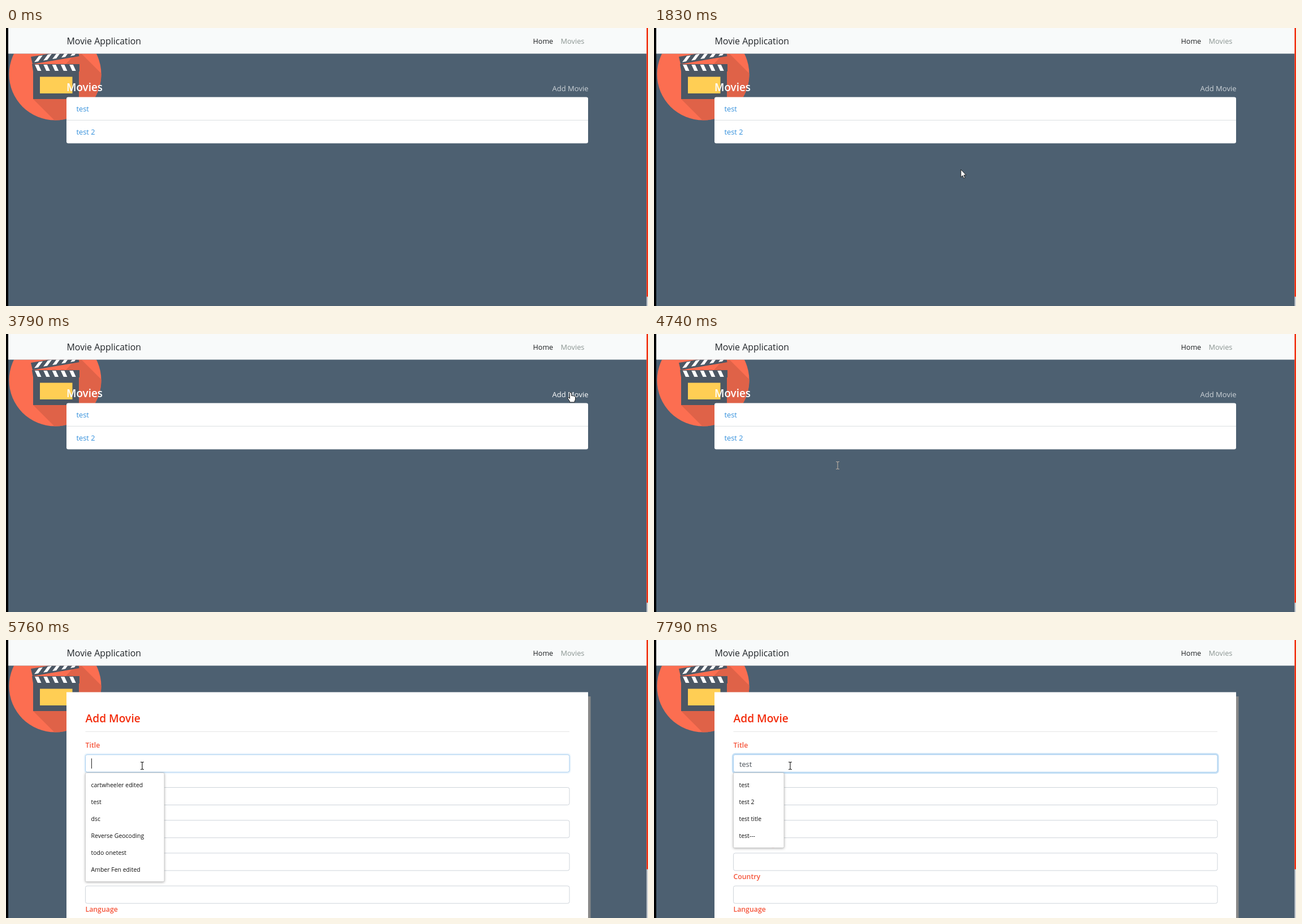
Write an HTML page that moves like this. It is 1136 px wide and 493 px high and loops after 8000 ms.

```html
<!DOCTYPE html>
<html lang="en">
<head>
<meta charset="utf-8">
<title>Movie Application</title>
<style>
  html, body { margin: 0; width: 100%; height: 100%; overflow: hidden; background: #4d6071; }
  svg { display: block; width: 100%; height: 100%; }
  text { font-family: "Open Sans", "Noto Sans", sans-serif; white-space: pre; }
  .menu { filter: drop-shadow(0 1.5px 2px rgba(0, 0, 0, .3)); }
</style>
</head>
<body>
<svg id="stage" viewBox="0 0 1136 493">
  <defs>
    <clipPath id="disc"><circle cx="87" cy="82" r="81.5"/></clipPath>
    <clipPath id="below"><rect y="45.5" width="1136" height="448"/></clipPath>
  </defs>
  <rect width="1136" height="493" fill="#4d6071"/>

  <g clip-path="url(#below)">
    <circle cx="87" cy="82" r="81.5" fill="#fc6e51"/>
    <path d="M48 126L92 170H180V92L128 40Z" fill="#df6248" clip-path="url(#disc)"/>
    <path d="M48 64H130V77H129V126H48V77L46 64Z" fill="#4c5764"/>
    <path d="M44 51L127 37L129.500 50L47 64Z" fill="#4c5764"/>
    <g id="stripes" fill="#fff"></g>
    <rect x="60" y="86.500" width="57.500" height="29.500" fill="#ffce54"/>
  </g>

  <rect width="1136" height="45.500" fill="#f8fafa"/>
  <g id="nav"></g>
  <g id="list"></g>
  <g id="form"></g>
  <rect x="1133.500" width="2.500" height="493" fill="#cfd2d6"/>
  <rect id="thumb" x="1133.500" width="2.500" fill="#f32c0c"/>
  <rect width="4" height="493" fill="#000"/>

  <g id="cursor">
    <path id="arrow" d="M0 0V13.500L3.100 10.700L5.200 15.600L7.300 14.700L5.200 9.900H9.300Z"
      fill="#fff" stroke="#111" stroke-width=".9" stroke-linejoin="round"/>
    <path id="hand" d="M-1.500 1.500Q0 -.5 1.500 1.500V6.500Q3 5.500 4 7Q5.500 6 6.500 7.500Q8.500 7 8.500 9V13Q8 15 7 16.500V18H-1.500V16.500L-4.700 11.500Q-5.500 9.500 -3.500 9.500L-1.500 11.500Z"
      fill="#fff" stroke="#111" stroke-width=".9" stroke-linejoin="round"/>
    <path id="beam" d="M-3 -6.500H-1L0 -5.500L1 -6.500H3M0 -5.500V5.500M-3 6.500H-1L0 5.500L1 6.500H3" fill="none" stroke-width="1.200"/>
  </g>
</svg>
<script>
const LOOP = 8000, STEP = 77, START = 580;
const OPEN = 4830, FOCUS = 5680, MENU = 5760;
const RED = '#f32c0c', LABEL = '#f5543a';
const $ = id => document.getElementById(id);

function add(parent, tag, attrs, content = '') {
  const el = document.createElementNS('http://www.w3.org/2000/svg', tag);
  for (const k in attrs) el.setAttribute(k, attrs[k]);
  el.textContent = content;
  return parent.appendChild(el);
}
const label = (parent, x, y, size, fill, content, more) =>
  add(parent, 'text', { x, y, 'font-size': size, fill, ...more }, content);
const box = (parent, x, y, width, height, fill, more) =>
  add(parent, 'rect', { x, y, width, height, fill, ...more });
const show = (el, on) => { el.style.display = on ? '' : 'none'; };
const BOLD = { 'font-weight': 600 };

// clapper stripes
for (let i = 0; i < 5; i++) {
  const x = 51 + i * 15.3, u = 56 + i * 16, y = 60.5 - i * 2.7;
  add($('stripes'), 'path', { d: `M${x} 65H${x + 6.5}L${x + 11.5} 76H${x + 5}Z` });
  add($('stripes'), 'path', { d: `M${u - 6} ${y}L${u + 1} ${y - 1.2}L${u + 9} ${y - 12}L${u + 2} ${y - 10.8}Z` });
}

label($('nav'), 107.5, 29, 15.9, '#212529', 'Movie Application');
label($('nav'), 932.5, 27.7, 12.6, '#1b1e20', 'Home');
label($('nav'), 981.5, 27.7, 12.8, '#8b9592', 'Movies');

const list = $('list');
label(list, 107, 112, 18.9, '#fff', 'Movies', BOLD);
const addLink = label(list, 1030.5, 112, 13, '#cdd3d8', 'Add Movie', { 'text-anchor': 'end' });
box(list, 107, 122.5, 923, 82, '#fff', { rx: 3.3 });
box(list, 107, 163, 923, 1, '#dcdfe1');
label(list, 124.5, 148, 12.8, '#3490dc', 'test');
label(list, 124.5, 189, 12.8, '#3490dc', 'test 2');

const form = $('form');
box(form, 111, 100, 923.5, 400, '#888');
box(form, 107, 92.5, 923, 410, '#fff');
label(form, 140.5, 146, 19.2, RED, 'Add Movie', BOLD);
box(form, 140.5, 162, 856.5, 1, '#e6e6e6');
const ring = box(form, 139.2, 201.8, 859, 34, 'none',
  { rx: 4.5, stroke: '#3490dc', 'stroke-opacity': .28, 'stroke-width': 2.8 });
const fields = ['Title', 'Description', 'Year', 'YKRO Rating', 'Country', 'Language'].map((name, i) => {
  const y = 58.2 * i;
  label(form, 140.5, 191.3 + y, 12.3, LABEL, name, BOLD);
  return box(form, 140.5, 203.3 + y, 856.5, 31, '#fff', { rx: 3.3, stroke: '#ced4da' });
});
const typed = label(form, 151, 224.5, 12.7, '#495057', '');
const caret = box(form, 151, 210, 1, 18, '#222');

function menu(width, items) {
  const g = add(form, 'g', { class: 'menu' });
  box(g, 140.5, 235.5, width, items.length * 30 + 13, '#fff', { rx: 2, stroke: '#c8c8c8', 'stroke-width': .8 });
  items.forEach((s, i) => label(g, 150.5, 261.2 + 30 * i, 10.5, '#111', s, { 'font-weight': 500 }));
  return g;
}
const allMenu = menu(139.5, ['cartwheeler edited', 'test', 'dsc', 'Reverse Geocoding', 'todo onetest', 'Amber Fen edited']);
const testMenu = menu(89.5, ['test', 'test 2', 'test title', 'test---']);

// pointer track: time, x, y
const track = [
  [580, 981, 481], [811, 945, 472], [1119, 854, 446], [1350, 689, 394], [1504, 590, 368],
  [1658, 532, 322], [1735, 526, 290], [1889, 560, 212], [2043, 660, 138], [2197, 789, 103],
  [2351, 880, 110], [2505, 963, 117], [2660, 1000, 118], [2890, 1005, 114], [3120, 1005, 114],
  [3121, 1004, 112], [3429, 1004, 112], [3506, 999, 103], [3737, 999, 103], [3891, 962, 108],
  [4199, 770, 131], [4584, 471, 168], [4661, 402, 195], [4738, 325, 233], [5046, 325, 233],
  [5354, 283, 227], [5600, 241, 223]
];
function pointer(t) {
  const q = START + Math.floor((t - START) / STEP) * STEP;
  const i = track.findIndex(k => k[0] > q);
  if (i < 0) return track[track.length - 1].slice(1);
  const [t0, x0, y0] = track[i - 1], [t1, x1, y1] = track[i];
  const p = (q - t0) / (t1 - t0);
  return [x0 + (x1 - x0) * p, y0 + (y1 - y0) * p];
}

function drawCursor(t) {
  show($('cursor'), t >= START);
  if (t < START) return;
  const [x, y] = pointer(t);
  const beam = t >= 4735, hand = !beam && x > 966 && y < 118 && t > 2540;
  $('cursor').setAttribute('transform', `translate(${x} ${y})`);
  show($('arrow'), !beam && !hand);
  show($('hand'), hand);
  show($('beam'), beam);
  $('beam').setAttribute('stroke', t < OPEN ? '#b5aaa0' : t < 5050 ? '#cf5b35' : '#222');
  addLink.setAttribute('fill', hand ? '#fff' : '#cdd3d8');
}

function render(t) {
  const open = t >= OPEN, focused = t >= FOCUS;
  show(list, !open);
  show(form, open);
  $('thumb').setAttribute('height', open ? 406.5 : 476.5);

  ring.setAttribute('opacity', Math.max(0, Math.min(1, (t - FOCUS) / 250)));
  fields[0].setAttribute('stroke', focused ? '#a1cbef' : '#ced4da');
  const n = t < 7020 ? 0 : t < 7080 ? 2 : t < 7240 ? 3 : 4;
  typed.textContent = 'test'.slice(0, n);
  caret.setAttribute('x', 151 + (n ? typed.getComputedTextLength() : 0));
  show(caret, focused && t < 6210 || t >= 6760 && t < 7790);
  show(allMenu, t >= MENU && !n);
  show(testMenu, n > 0);
  drawCursor(t);
}

const begin = performance.now();
function tick() {
  render((performance.now() - begin) % LOOP);
  requestAnimationFrame(tick);
}
tick();
</script>
</body>
</html>
```
